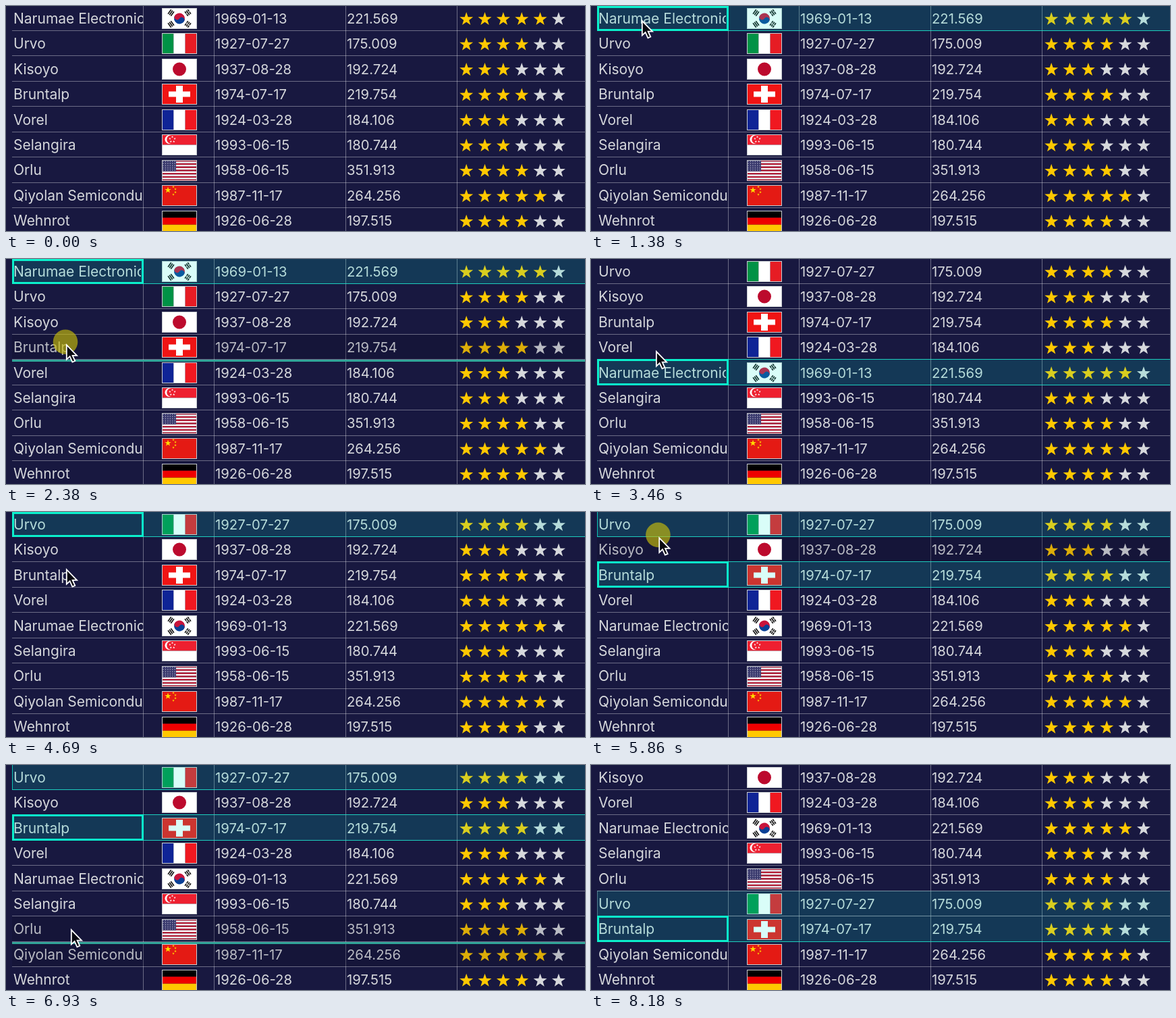
An HTML page with a canvas for the animation above (8940 ms loop, 858x333 px).

```html
<!DOCTYPE html>
<html lang="en">
<head>
<meta charset="utf-8">
<title>Row dragging in a data grid</title>
<style>
  html, body { margin: 0; width: 100%; height: 100%; overflow: hidden; background: #181840; }
  canvas { display: block; }
</style>
</head>
<body>
<canvas id="stage" width="858" height="333"></canvas>
<script>
const ctx = document.getElementById('stage').getContext('2d');
const LOOP = 8940, FPS = 13, PITCH = 37.45, LEFT = 9, RIGHT = 858;
const FLAG_W = 52, FLAG_H = 31;
const COLUMNS = [203, 308, 503, 668];
const TEXT = '#d6d8dc', GOLD = '#ffc800', TEAL = '#0bf0cc';

const rows = [
  ['Narumae Electronics', korea, '1969-01-13', '221.569', 5],
  ['Urvo', () => stripes(true, '#009246', '#fff', '#e61c24'), '1927-07-27', '175.009', 4],
  ['Kisoyo', japan, '1937-08-28', '192.724', 3],
  ['Bruntalp', swiss, '1974-07-17', '219.754', 4],
  ['Vorel', () => stripes(true, '#0f2496', '#fff', '#f01820'), '1924-03-28', '184.106', 3],
  ['Selangira', singapore, '1993-06-15', '180.744', 3],
  ['Orlu', usa, '1958-06-15', '351.913', 4],
  ['Qiyolan Semiconductor', china, '1987-11-17', '264.256', 5],
  ['Wehnrot', () => stripes(false, '#000', '#e00', '#ffc800'), '1926-06-28', '197.515', 4]
];

// [time, value]: the last entry already reached applies
const orders = [
  [0, [0, 1, 2, 3, 4, 5, 6, 7, 8]],
  [3070, [1, 2, 3, 4, 0, 5, 6, 7, 8]],
  [7000, [2, 4, 0, 5, 6, 1, 3, 7, 8]]
];
// the last selected row also holds the cell focus
const selections = [[0, []], [1230, [0]], [3920, [1]], [4840, [1, 3]]];
const presses = [[1230, 1370], [1690, 2910], [3920, 4070], [4840, 5000], [5690, 6920]];
const drags = [[1690, 3070], [5690, 7000]];

const smooth = p => p * p * (3 - 2 * p);
const early = p => smooth(Math.min(1, p * 1.8));
const easeOut = p => 1 - (1 - p) ** 2;
const easeIn = p => p * p;
// start, end, destination x and y, easing of x and y
const moves = [
  [300, 1150, 75, 21, easeOut, easeOut],
  [1760, 2770, 89, 177, early, smooth],
  [3230, 3930, 100, 17, early, smooth],
  [4300, 4850, 89, 101, early, smooth],
  [5080, 5530, 102, 16, early, smooth],
  [5670, 6600, 96, 243, early, smooth],
  [7600, 8150, 652, 352, easeIn, easeIn]
];

const latest = (list, t) => list.filter(e => t >= e[0]).pop()[1];
const within = (spans, t) => spans.some(([a, b]) => t >= a && t < b);
const lineY = i => Math.floor(PITCH * (i + 1) - 1);
const rowAt = y => Math.floor((y + 1) / PITCH);

function pointer(t) {
  let x = 356, y = 291;
  for (const [start, end, toX, toY, easeX, easeY] of moves) {
    if (t < start) break;
    const p = Math.min(1, (t - start) / (end - start));
    x += (toX - x) * easeX(p);
    y += (toY - y) * easeY(p);
  }
  return { x, y };
}

function rect(color, x, y, w, h) {
  ctx.fillStyle = color;
  ctx.fillRect(x, y, w, h);
}
function disc(color, x, y, r, from = 0, to = 7) {
  ctx.fillStyle = color;
  ctx.beginPath();
  ctx.arc(x, y, r, from, to);
  ctx.fill();
}
function star(color, x, y, r) {
  ctx.fillStyle = color;
  ctx.beginPath();
  for (let i = 0; i < 10; i++) {
    const a = i * Math.PI / 5, d = i % 2 ? r * 0.4 : r;
    ctx.lineTo(x + d * Math.sin(a), y - d * Math.cos(a));
  }
  ctx.fill();
}

// Flags are drawn around their centre
function stripes(vertical, ...colors) {
  const w = FLAG_W / colors.length, h = FLAG_H / colors.length;
  colors.forEach((c, i) => vertical
    ? rect(c, i * w - FLAG_W / 2, -FLAG_H / 2, w, FLAG_H)
    : rect(c, -FLAG_W / 2, i * h - FLAG_H / 2, FLAG_W, h));
}
function korea() {
  stripes(true, '#fff');
  ctx.save();
  ctx.rotate(0.55);
  disc('#c8143c', 0, 0, 8, Math.PI, 2 * Math.PI);
  disc('#0a4096', 0, 0, 8, 0, Math.PI);
  disc('#c8143c', -4, 0, 4);
  disc('#0a4096', 4, 0, 4);
  ctx.restore();
  for (const [sx, sy] of [[-1, -1], [1, -1], [-1, 1], [1, 1]]) {
    ctx.save();
    ctx.translate(sx * 12.5, sy * 8.5);
    ctx.rotate(-sx * sy * 0.95);
    for (let k = -1; k < 2; k++) {
      rect('#111', -4, k * 2.6 - 0.8, 8, 1.6);
      if (sx > 0 && (k || sy > 0)) rect('#fff', -0.5, k * 2.6 - 0.8, 1, 1.6);
    }
    ctx.restore();
  }
}
function japan() {
  stripes(true, '#fff');
  disc('#bc0a2d', 0, 0, 10);
}
function swiss() {
  stripes(true, '#f01414');
  rect('#fff', -16, -4, 32, 8);
  rect('#fff', -5, -12.5, 10, 25);
}
function singapore() {
  stripes(false, '#ee2030', '#fff');
  disc('#fff', -15, -8, 6.5);
  disc('#ee2030', -12.5, -8, 6.2);
  for (let i = 0; i < 5; i++) {
    const a = i * Math.PI * 0.4;
    star('#fff', -10.5 + 3.8 * Math.sin(a), -8 - 3.8 * Math.cos(a), 1.7);
  }
}
function usa() {
  stripes(false, ...Array.from({ length: 13 }, (_, i) => i % 2 ? '#fff' : '#b8223a'));
  rect('#38386c', -26, -16, 21, 17.2);
  for (let j = 0; j < 5; j++)
    for (let i = 0; i < 6; i++) rect('#c4c4d8', -24.5 + i * 3.4, -14 + j * 3.2, 1.2, 1.2);
}
function china() {
  stripes(true, '#e41a14');
  star('#ffd800', -17, -8, 5);
  for (const [x, y] of [[-9, -13], [-6, -9.5], [-6, -5], [-9, -1.5]]) star('#ffd800', x, y, 1.9);
}

function drawFlag(paint, y) {
  const frame = [-FLAG_W / 2, -FLAG_H / 2, FLAG_W, FLAG_H];
  ctx.save();
  ctx.translate(257, y);
  ctx.beginPath();
  ctx.rect(...frame);
  ctx.clip();
  paint();
  ctx.strokeStyle = '#c8ccd0';
  ctx.lineWidth = 2;
  ctx.strokeRect(...frame);
  ctx.restore();
}

function label(text, x, y, size, right) {
  ctx.save();
  ctx.beginPath();
  ctx.rect(x - 1, y - 30, right - x + 1, 40);
  ctx.clip();
  ctx.fillStyle = TEXT;
  ctx.font = `${size}px Inter, sans-serif`;
  ctx.fillText(text, x, y);
  ctx.restore();
}

function drawRow([name, flag, date, value, rating], i, focused, dimmed) {
  const mid = PITCH * i + 18, base = Math.round(mid + 7.7);
  ctx.globalAlpha = dimmed ? 0.85 : 1;
  label(name, 11, base, 21, focused ? 200 : 203);
  label(date, 310, base, 20.3, 503);
  label(value, 505, base, 20.3, 668);
  for (let k = 0; k < 6; k++) star(k < rating ? GOLD : TEXT, 682.2 + k * 27.35, mid + 1.6, 10.5);
  ctx.globalAlpha = 1;
  drawFlag(flag, Math.round(mid) + 0.5);
}

// Adjoining selected rows form one block with a pale upper part
function drawSelection(i, focused, joinsAbove, joinsBelow) {
  const top = lineY(i - 1), bottom = lineY(i), width = RIGHT - LEFT;
  const edge = joinsBelow ? 'rgba(120,170,180,.6)' : 'rgba(11,230,205,.8)';
  rect('rgba(0,240,210,.15)', LEFT, top + 1, width, bottom - top - 1);
  if (!joinsAbove) rect(edge, LEFT, top, width, 1);
  rect(edge, LEFT, bottom, width, 1);
  rect(edge, LEFT, top, 1, bottom - top);
  if (!focused) return;
  const y = Math.max(0, top);
  ctx.strokeStyle = TEAL;
  ctx.lineWidth = 3;
  ctx.strokeRect(10.5, y + 1.5, 192, bottom - y - 2);
}

function drawPointer({ x, y }, pressed) {
  if (pressed) disc('rgba(200,190,10,.65)', x - 1, y - 3.5, 18.3);
  ctx.save();
  ctx.translate(x, y);
  ctx.beginPath();
  for (const [px, py] of [[0.8, 1], [0.8, 22.5], [5.6, 18], [9.4, 26.3], [13.3, 24.6], [9.6, 16.6], [16, 16.6]])
    ctx.lineTo(px, py);
  ctx.closePath();
  ctx.fillStyle = '#080810';
  ctx.strokeStyle = '#fff';
  ctx.lineWidth = 1.8;
  ctx.fill();
  ctx.stroke();
  ctx.restore();
}

function draw(t) {
  const order = latest(orders, t), selected = latest(selections, t);
  const focus = selected[selected.length - 1];
  const tip = pointer(t), dragging = within(drags, t);
  const isSelected = i => selected.includes(order[i]);

  rect('#181840', 0, 0, 858, 333);
  const grid = 'rgba(255,255,255,.36)';
  for (const x of COLUMNS) rect(grid, x, 0, 1, 333);
  for (let i = 0; i < 8; i++) rect(grid, LEFT, lineY(i), RIGHT - LEFT, 1);

  order.forEach((id, i) => {
    const trailing = id === 7 && t >= 6530;
    const dimmed = dragging && !isSelected(i) && (i === rowAt(tip.y) || trailing);
    if (dimmed) rect('rgba(16,16,40,.3)', LEFT, lineY(i - 1) + 1, RIGHT - LEFT, 36);
    drawRow(rows[id], i, id === focus, dimmed);
  });
  order.forEach((id, i) => {
    if (isSelected(i)) drawSelection(i, id === focus, isSelected(i - 1), isSelected(i + 1));
  });

  const target = rowAt(tip.y - 3);
  if (dragging && !isSelected(target))
    rect('#30a498', LEFT, lineY(target) + 1, RIGHT - LEFT, 3);
  if (t >= 300 && t < 8150) drawPointer(tip, within(presses, t));
}

function tick() {
  const t = performance.now() % LOOP;
  draw(Math.floor((t + 8) * FPS / 1000) * 1000 / FPS);
  requestAnimationFrame(tick);
}
tick();
</script>
</body>
</html>
```
